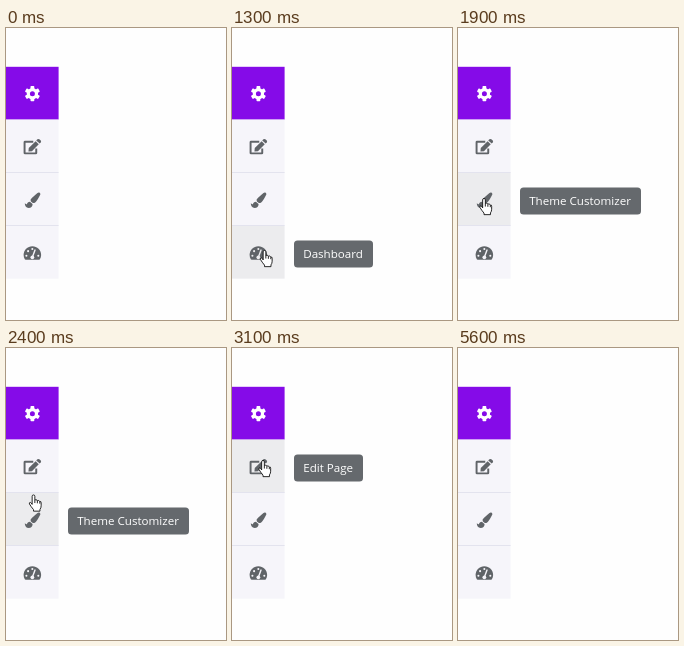
Write an HTML page that moves like this. It is 220 px wide and 292 px high and loops after 5.7 s.

```html
<!DOCTYPE html>
<html lang="en">
<head>
<meta charset="utf-8">
<title>Side toolbar tooltips</title>
<style>
  html, body { margin: 0; width: 100%; height: 100%; overflow: hidden; background: #fefefe; }
  svg { display: block; width: 220px; height: 292px; }
  .row { --bg: #f6f5fa; }
  .row.hover { --bg: #ececee; }
  .bg, .hole { fill: var(--bg); }
  .icon { fill: #606468; }
  .pen { fill: none; stroke: #606468; stroke-width: 64; }
  .needle { stroke: var(--bg); stroke-width: 46; stroke-linecap: round; }
  .tip rect { fill: #65696d; }
  .tip text { fill: #fff; font: 500 11.6px "Open Sans", "Noto Sans", sans-serif; }
  .cursor { fill: #fff; stroke: #111; stroke-linejoin: round; }
</style>
</head>
<body>
<svg viewBox="0 0 220 292">
  <rect y="38.8" width="52.6" height="52.8" fill="#850be8"/>
  <g id="gear" transform="translate(26.4 65.7)" fill="#fff">
    <circle r="4.1" fill="none" stroke="#fff" stroke-width="3.2"/>
  </g>

  <g class="row">
    <rect class="bg" y="91.6" width="52.6" height="53"/>
    <g class="icon" transform="translate(17.6 110.8) scale(.0304)">
      <path class="pen" d="M318 96H48Q32 96 32 112V464Q32 480 48 480H400Q416 480 416 464V322"/>
      <path d="M396 78L498 180 274 406 160 416 170 302Z"/>
      <path d="M417 54L453 18Q488-8 516 12L565 60Q588 88 565 115L529 151Z"/>
    </g>
  </g>

  <g class="row">
    <rect class="bg" y="144.6" width="52.6" height="53"/>
    <g class="icon" transform="translate(18.8 164.4) scale(.0304)">
      <path d="M167 309C127 312 90 327 70 382 67 388 62 392 55 392 44 392 10 364 0 357 0 440 38 512 128 512 204 512 256 468 256 392L255 383Z"/>
      <path d="M458 0C443 0 429 7 418 16 213 199 192 203 192 257 192 271 195 284 201 296L265 349C272 351 279 352 287 352 349 352 385 307 498 96 506 81 512 66 512 50 512 21 486 0 458 0Z"/>
    </g>
  </g>

  <g class="row">
    <rect class="bg" y="197.6" width="52.6" height="53"/>
    <g class="icon" transform="translate(17.6 217.2) scale(.0304)">
      <path d="M288 32C129 32 0 161 0 320 0 373 14 422 39 465 45 474 55 480 66 480H510C521 480 531 474 537 465 562 422 576 373 576 320 576 161 447 32 288 32Z"/>
      <g class="hole">
        <circle cx="288" cy="124" r="34"/>
        <circle cx="148" cy="196" r="34"/>
        <circle cx="92" cy="350" r="34"/>
        <circle cx="484" cy="350" r="34"/>
        <circle cx="288" cy="400" r="62"/>
      </g>
      <path class="needle" d="M288 400L376 160"/>
    </g>
  </g>

  <path d="M0 144.5H52.6M0 197.5H52.6" stroke="#e3e3ee"/>
  <g id="tips"></g>
  <g id="hand">
    <path class="cursor" transform="scale(.9)" d="M-1.5 11V2Q-1.5 .5 0 .5T1.5 2V6.5Q1.7 5.6 3 5.8T4.3 7.2Q4.8 6.3 5.8 6.7T7 8Q8.5 7.2 8.5 9.2V12.5Q8.5 15 7.2 16.5V18.5H0V16.8Q-2.8 13.5-4.5 10.5Q-5 8.8-3.5 8.8Q-2.5 9-1.5 11ZM1.5 6.5V9.5M4.3 7.2V9.8M7 8V10.2"/>
  </g>
  <g id="arrow">
    <path class="cursor" d="M.5 .5V15.5L3.9 12.3 6 17.5 8.2 16.5 6.1 11.5H11Z"/>
  </g>
</svg>

<script>
const LOOP = 5700, STEP = 100, FADE = 300;
const FIRST_ROW = 91.6, ROW_H = 53, BAR_W = 52.6;
const ENTER = { x: 19, y: 284, at: 400 }, GONE = 3800;

const clamp = u => Math.min(1, Math.max(0, u));
const smooth = u => u * u * (3 - 2 * u);
const easeOut = n => u => 1 - (1 - u) ** n;
const easeIn = u => u * u;

// Pointer moves, each starting where the last one ended
const MOVES = [
  { from: 400, to: 1300, x: 32.5, y: 222, ease: easeOut(1.6) },
  { from: 1500, to: 1900, x: 26, y: 170, ease: easeOut(2.2) },
  { from: 2200, to: 2600, x: 29, y: 123, ease: smooth },
  { from: 2600, to: 3100, x: 31, y: 112, ease: smooth },
  { from: 3100, to: 3600, x: 64, y: 59.5, ease: easeIn },
  { from: 3600, to: 3700, x: 206, y: 2, ease: smooth }
];

// Top to bottom; the pointer visits them from the bottom up
const ITEMS = [
  { label: "Edit Page", width: 69, enter: 2520, leave: 3430 },
  { label: "Theme Customizer", width: 121, enter: 1600, leave: 2520 },
  { label: "Dashboard", width: 79, enter: 780, leave: 1600 }
];

const $ = id => document.getElementById(id);
const rows = document.querySelectorAll(".row");

function add(parent, tag, attrs, text = "") {
  const el = document.createElementNS("http://www.w3.org/2000/svg", tag);
  for (const key in attrs) el.setAttribute(key, attrs[key]);
  el.textContent = text;
  return parent.appendChild(el);
}

for (let k = 0; k < 6; k++) {
  add($("gear"), "rect", { x: -1.9, y: -7.6, width: 3.8, height: 4, rx: .7, transform: `rotate(${k * 60})` });
}

ITEMS.forEach((item, i) => {
  const y = FIRST_ROW + i * ROW_H + 15;
  item.row = rows[i];
  item.tip = add($("tips"), "g", { class: "tip" });
  add(item.tip, "rect", { y, width: item.width, height: 27, rx: 3.5 });
  add(item.tip, "text", { x: 9.2, y: y + 17.4 }, item.label);
});

function pointer(t) {
  let { x, y } = ENTER;
  for (const m of MOVES) {
    const p = m.ease(clamp((t - m.from) / (m.to - m.from)));
    x += (m.x - x) * p;
    y += (m.y - y) * p;
  }
  return { x, y };
}

function place(el, shown, { x, y }) {
  el.style.visibility = shown ? "visible" : "hidden";
  el.setAttribute("transform", `translate(${x} ${y})`);
}

function draw(t) {
  const pos = pointer(t);
  const shown = t >= ENTER.at && t < GONE;
  const overBar = pos.x < BAR_W && pos.y < FIRST_ROW + ITEMS.length * ROW_H;
  place($("hand"), shown && overBar, pos);
  place($("arrow"), shown && !overBar, pos);

  for (const { row, tip, enter, leave } of ITEMS) {
    const o = smooth(clamp((t - enter) / FADE)) - smooth(clamp((t - leave) / FADE));
    row.classList.toggle("hover", t >= enter && t < leave);
    tip.setAttribute("opacity", o);
    tip.setAttribute("transform", `translate(${57.4 + 4.6 * o} 0)`);
  }
}

const start = performance.now();
function tick() {
  const t = (performance.now() - start) % LOOP;
  draw(Math.floor(t / STEP) * STEP);
  requestAnimationFrame(tick);
}
tick();
</script>
</body>
</html>
```
